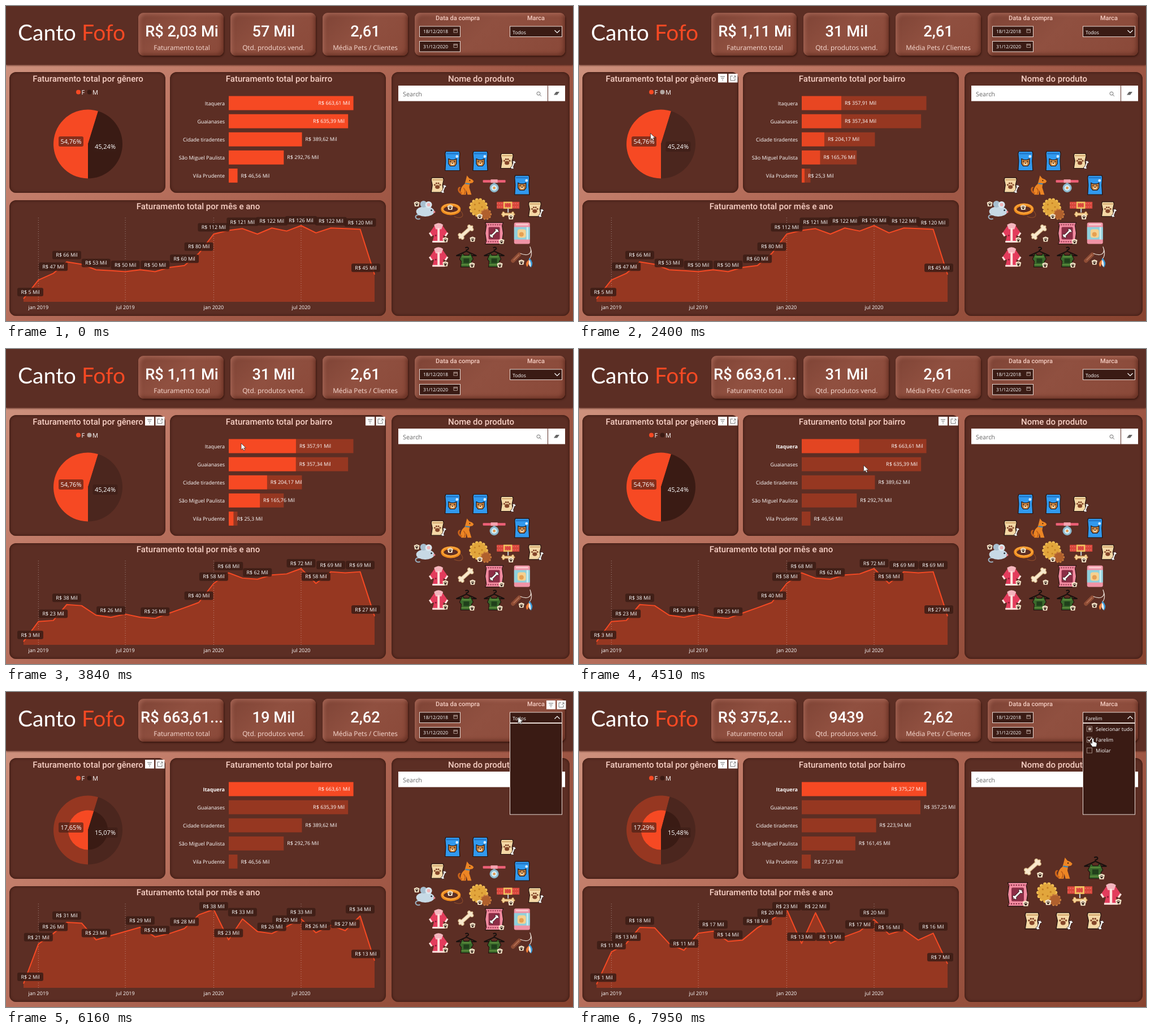
An HTML page for the animation above (8 s loop, 1003x558 px).

```html
<!DOCTYPE html>
<html lang="pt-BR">
<head>
<meta charset="utf-8">
<title>Painel de vendas</title>
<style>
html, body { margin: 0; width: 100%; height: 100%; overflow: hidden; }
body {
  position: relative;
  background: linear-gradient(140deg, #cf9480 5%, #bf7865 30%, #a15947 62%, #87432f);
}
div, svg { position: absolute; box-sizing: border-box; }
svg { left: 0; top: 0; }
#head { left: 0; top: 0; width: 100%; height: 104px; background: #5c2e24; box-shadow: 0 1px 3px #4a2017; }
.panel { background: #5c2e24; border-radius: 12px; box-shadow: inset 0 0 4px 1px #3f1c14; }
.card {
  border-radius: 9px;
  background: linear-gradient(135deg, #7f4436, #905040 45%, #8a4939);
  box-shadow: inset 5px 5px 6px -2px #b8766590, inset -5px -5px 6px -2px #5b281db0, 1px 2px 3px #3b1810;
}
text { font-family: "Open Sans", "Noto Sans", sans-serif; font-size: 9px; fill: #fff; text-rendering: geometricPrecision; }
.din { font-family: Roboto, sans-serif; font-weight: 500; }
.title { font-size: 15px; fill: #f7cfc4; }
.sub { font-size: 11px; fill: #f7cfc4; }
.big { font-size: 27.3px; }
.cap { font-size: 11.8px; fill: #f9dcd3; }
.brand { font-family: Lato, sans-serif; font-size: 39px; }
.pct { font-size: 11px; }
.date { font-size: 8.3px; }
.pick { font-size: 8.6px; }
.find { font-size: 10.8px; fill: #666; }
.bold { font-weight: 700; }
</style>
</head>
<body>
<div id="head"></div>
<svg id="stage" width="1003" height="558" viewBox="0 0 1003 558"></svg>
<script>
const LOOP = 8000;
const HOT = '#f64923', DIM = '#963721', DARK = '#3a1b14', DARK_DIM = '#4b261e';
const stage = document.getElementById('stage');

// ---- helpers ----
const lerp = (a, b, p) => a + (b - a) * p;
const clamp = (v, a, b) => Math.min(b, Math.max(a, v));
const ease = p => p < .5 ? 2 * p * p : 1 - 2 * (1 - p) ** 2;
const nums = s => s.split(' ').map(Number);

const text = (x, y, s, cls = '', anchor = 'start', fill = '') =>
  `<text x="${x}" y="${y}" class="${cls}" text-anchor="${anchor}"${fill && ` style="fill:${fill}"`}>${s}</text>`;
const mid = (x, y, s, cls) => text(x, y, s, cls, 'middle');
const rect = (x, y, w, h, fill, more = '') =>
  `<rect x="${x}" y="${y}" width="${w}" height="${h}" fill="${fill}" ${more}/>`;
const path = (d, fill, more = '') => `<path d="${d}" fill="${fill}" ${more}/>`;
const line = (d, color, w = 1, more = '') => path(d, 'none', `stroke="${color}" stroke-width="${w}" ${more}`);
const dot = (x, y, r, fill, more = '') => `<circle cx="${x}" cy="${y}" r="${r}" fill="${fill}" ${more}/>`;
const oval = (x, y, rx, ry, fill, more = '') =>
  `<ellipse cx="${x}" cy="${y}" rx="${rx}" ry="${ry}" fill="${fill}" ${more}/>`;
const group = (x, y, inner, more = '') => `<g transform="translate(${x} ${y}) ${more}">${inner}</g>`;

// ---- clicks: each visual answers after its own delay ----
const CLICKS = [2070, 4200, 7260];
const WAIT = { bars: 167, cards: 250, charts: 380 };
const phase = (t, wait = 0) => CLICKS.filter(c => t >= c + wait).length;
const progress = (t, wait) => {
  const n = phase(t, wait);
  return n ? ease(clamp((t - CLICKS[n - 1] - wait) / 300, 0, 1)) : 1;
};

// ---- product icons, drawn around 0,0 ----
const INK = 'stroke="#24130f" stroke-width="1.2" stroke-linejoin="round"';
const bone = (x, y, k, turn, fill, edge = '') => group(x, y,
  path('M-7-2.5C-8-7-13-6-12-2C-15-1-15 1-12 2C-13 6-8 7-7 2.5H7C8 7 13 6 12 2C15 1 15-1 12-2C13-6 8-7 7-2.5Z', fill, edge),
  `rotate(${turn}) scale(${k})`);
const paw = (x, y, k, fill) => group(x, y,
  oval(0, 2, 3.4, 2.8, fill) + [-4, -1.5, 1.5, 4].map(u => dot(u, u * u / 6 - 3.8, 1.3, fill)).join(''), `scale(${k})`);
const badge = (x, y) => path(`M${x - 5} ${y - 3}l5-2l5 2l-1.5 7h-7z`, '#f8e8cc') + paw(x, y, .55, '#2b1711');
const ring = (n, r, draw) => Array.from({ length: n }, (_, i) =>
  draw(r * Math.cos(i * 2 * Math.PI / n), r * Math.sin(i * 2 * Math.PI / n))).join('');

const ICONS = {
  feed: () => path('M-12-17H12L13-13L12 0L13 17H-13L-12 0L-13-13Z', '#3199ee', INK)
    + rect(-11, -14, 22, 2, '#1f72c4') + dot(8, -8, 2.4, '#cfe9ff')
    + path('M-7-4L-3-2H3L7-4V5L4 9H-4L-7 5Z', '#c88443', INK)
    + oval(0, 5, 3, 2.6, '#f3d4a5') + dot(-3.5, 1, 1, '#24130f') + dot(3.5, 1, 1, '#24130f') + dot(0, 4, 1.1, '#24130f'),
  treat: () => path('M-12-13H8L9-9L7 0L9 13H-13L-11 0L-13-9Z', '#f4d8a6', INK)
    + rect(-11, -10, 19, 1.5, '#c89a5d') + paw(-2, 1, 1.2, '#84462a') + bone(9, 7, .55, -70, '#fff', INK),
  dog: () => path('M1-17L5-12L10-10L13-7L11-4L6-3L5 4L9 17H2L0 9L-1 17H-9C-12 10-9 2-3-2L-1-9Z', '#ec8524')
    + line('M-8 15C-17 11-13 3-11 5', '#cc641a', 3) + line('M-2-3L6-2', '#3b83b7', 2)
    + dot(6, -8, 1, '#24130f') + line('M-4 16C-1 12-2 8-5 5', '#bb5b18', 1.5),
  leash: () => rect(-20, -9, 40, 4.5, '#ee6077', 'rx="1"') + rect(-6, -10, 12, 6, '#f7a2ae')
    + rect(-2, -4, 4, 6, '#8cabb9') + dot(0, 5, 8, '#8bb9cd') + dot(0, 5, 5, '#d6edf3') + dot(0, 5, 2.3, '#e4964b'),
  mouse: () => line('M-7 10C-20 8-18 20-8 17', '#9ab3c4', 2) + oval(1, 4, 16, 9, '#c7d9e5')
    + dot(-2, -9, 6, '#a8bfd0') + dot(7, -8, 6, '#dbe9f1') + dot(7, -8, 3, '#efb2b5')
    + dot(12, 2, 1.4, '#26313a') + dot(17, 5, 1.8, '#ec8b93') + badge(-14, -9),
  collar: () => line('M13 2C24 12 16 18 3 13', '#8a4a2b', 1.2)
    + oval(-3, 0, 15, 8, 'none', 'stroke="#ef8b1c" stroke-width="5"')
    + oval(-3, -1, 15, 8, 'none', 'stroke="#ffc164" stroke-width="1"') + badge(-4, -3),
  cookies: () => ring(14, 14, (x, y) => dot(x - 3, y - 3, 2.8, '#f1bd52')) + dot(-3, -3, 14, '#e2a63c')
    + ring(10, 8, (x, y) => dot(x + 10, y + 9, 2.2, '#c97b3c')) + dot(10, 9, 8, '#b0602d')
    + ring(5, 7, (x, y) => dot(x - 4, y - 4, 1.5, '#c47f24')) + badge(-1, 13),
  buckle: () => rect(-20, -13, 40, 12, '#d9473d') + line('M-20-10H20M-20-4H20', '#f28473', 1, 'stroke-dasharray="2 2"')
    + rect(-7, -12, 13, 10, 'none', 'stroke="#f2c35f" stroke-width="2.5"') + line('M0-1V6', '#c7d2d8', 2)
    + bone(0, 9, .85, 0, '#f4d296', 'stroke="#b97a3a"') + badge(5, 14),
  coat: () => path('M-6-15L6-15L15-2L13 5L8 4L11 16H-11L-8 4L-13 5L-15-2Z', '#e33c5c')
    + path('M-8-15Q0-21 8-15L5-7H-5Z', '#f5b5bd') + path('M-2-9H2V16H-2Z', '#ffe3de')
    + line('M-16-1L-12 5M16-1L12 5M-11 15H11', '#ffe3de', 3) + dot(-5, 4, 1.5, '#8f1d38') + badge(12, 12),
  bone: () => bone(-1, -2, 1.15, -42, '#f8e9cd', 'stroke="#d9b98a"') + badge(11, 11),
  snack: () => path('M-16-19H16L14-14L16 0L14 14L16 19H-16L-14 14L-16 0L-14-14Z', '#f28ba0', INK)
    + line('M-15-15H15M-15 15H15', '#8a2d45', 2, 'stroke-dasharray="2 2"') + rect(-10, -11, 20, 22, '#8a2d45', 'rx="2"')
    + bone(0, 0, .7, -45, '#fff', INK) + badge(13, 15),
  can: () => rect(-14, -19, 28, 38, '#ef93a5', 'rx="3"') + rect(-14, -11, 28, 22, '#8fd0dc')
    + rect(-8, -7, 15, 15, '#f5d190', 'rx="4"') + dot(-1, 2, 4, '#e6a052') + rect(-11, -17, 22, 3, '#fac9cf') + rect(8, -11, 3, 22, '#c9edf1'),
  vest: () => line('M0-10V-13C6-14 4-20-2-17M0-11L-18-3H18Z', '#17100e', 2)
    + path('M-7-8L-4-4H4L7-8L12 3L9 7L10 17H-10L-9 7L-12 3Z', '#3a6a2c', INK)
    + path('M-5 2H5V10H-5Z', '#203f1b') + line('M-9 13H9M-8-1H8', '#6c9b43', 1.2) + badge(10, 14),
  wand: () => line('M-16 6L-5-5', '#8f4d35', 7, 'stroke-linecap="round"') + line('M-15 5L-5-5', '#bc765a', 1.5)
    + line('M-3-7C8-2 20-5 14-19M14-19Q20-5 13 3', '#e6d8ce', 1.2) + path('M13 1Q22 9 16 18Q8 11 13 1Z', '#3c9bd9')
    + path('M12 4Q13 12 9 17Q4 11 12 4Z', '#f07e38') + path('M13 4Q17 11 15 17Q10 12 13 4Z', '#f6eee5') + badge(-1, 9)
};

const shelf = (rows, cx, top, dx, dy, k) => rows.map((row, r) => row.split(' ').map((name, i, all) =>
  group(cx + (i - (all.length - 1) / 2) * dx, top + r * dy, ICONS[name](), `scale(${k})`)).join('')).join('');
const SHELF_ALL = shelf(['feed feed treat', 'treat dog leash feed', 'mouse collar cookies buckle treat',
  'coat bone snack can', 'coat vest vest wand'], 839, 274.5, 49.2, 42.7, 1);
const SHELF_BRAND = shelf(['bone dog vest', 'snack cookies buckle coat', 'treat treat treat'], 858.5, 312, 55, 46.6, 1.1);

// ---- data, one entry per phase ----
const CARDS = [
  ['Faturamento total', ['R$ 2,03 Mi', 'R$ 1,11 Mi', 'R$ 663,61...', 'R$ 375,2...']],
  ['Qtd. produtos vend.', ['57 Mil', '31 Mil', '19 Mil', '9439']],
  ['Média Pets / Clientes', ['2,61', '2,61', '2,62', '2,62']]
];
const PLACES = ['Itaquera', 'Guaianases', 'Cidade tiradentes', 'São Miguel Paulista', 'Vila Prudente'];
const SALES = nums('663.61 635.39 389.62 292.76 46.56');
const SALES_F = nums('357.91 357.34 204.17 165.76 25.3');
const SALES_BRAND = nums('375.27 357.25 223.94 161.45 27.37');

// month:value is tagged, month~value only bends the curve, gaps are straight
const MONTHS = 25;
const CURVES = [
  '0:5 1~36 2:47 3:66 4~62 5:53 7:50 8~53 9:50 10~57 11:60 12:80 13:112 14~118 15:121 16~112 17:122 18~117 19:126 20~114 21:122 23:120 24:45',
  '0:3 1~22 2:23 3:38 4~37 5~28 6:26 7~29 8~26 9:25 12:40 13:58 14:68 15~63 16:62 17~66 18~67 19:72 20:58 21:69 22~68 23:69 24:27',
  '0:2 1:21 2:26 3:31.4 4~31 5:23 8:29 9:24.4 10~26 11:28.4 12~35 13:37.6 14:23 15:33 16~27 17:26 18:29.4 19:33 20:26.4 21~30 22:27.4 23:34.4 24:13',
  '0:1 1:10.5 2:13 3:17.7 4~17.6 5~13 6:11 7~16 8:16.6 9:13.6 10~14 11:17.6 12:20 13:23 14:13 15:22 16:13 17~15 18:16.6 19:20 20:15.7 21~17 22~14 23:16 24:7'
].map((series, n) => {
  const keys = series.split(' ').map(s => [...s.split(/[:~]/).map(Number), s.includes(':')]);
  const top = Math.max(...keys.map(k => k[1])), height = n < 2 ? 135 : 139;
  const ys = Array.from({ length: MONTHS }, (_, i) => {
    const b = keys.find(k => k[0] >= i), a = keys.findLast(k => k[0] <= i);
    const v = a === b ? a[1] : lerp(a[1], b[1], (i - a[0]) / (b[0] - a[0]));
    return 524 - height * v / top;
  });
  return { ys, tags: keys.filter(k => k[2]).map(([i, v]) => [i, Math.round(v)]) };
});
const START = Date.UTC(2018, 11, 1);
const monthX = i => 31 + (Date.UTC(2018, 11 + i, 1) - START) / 864e5 * .8495;

const POINTER = [
  [890, 0, 60], [1650, 114, 222], [1930, 126, 225], [3080, 127, 226], [3500, 300, 233], [3840, 416, 167],
  [4170, 416, 167], [4510, 503, 206], [4930, 748, 190], [5700, 905, 45], [6250, 906, 44], [7060, 909, 82]
];
const pointerAt = t => {
  if (t < POINTER[0][0]) return null;
  const k = POINTER.findIndex(s => s[0] > t);
  if (k < 0) return POINTER.at(-1).slice(1);
  const [a, b] = [POINTER[k - 1], POINTER[k]], p = (t - a[0]) / (b[0] - a[0]);
  return [lerp(a[1], b[1], p), lerp(a[2], b[2], p)];
};

// ---- fixed parts ----
const box = (cls, x, y, w, h) => {
  const el = document.createElement('div');
  el.className = cls;
  el.style.cssText = `left:${x}px;top:${y}px;width:${w}px;height:${h}px`;
  document.body.insertBefore(el, stage);
};
const GENDER = [6, 117, 276, 214], PLACE = [290, 117, 382, 214], PRODUCT = [682, 117, 315, 432], BRAND = [892, 12, 100, 76];
[GENDER, PLACE, [6, 344, 666, 205], PRODUCT].forEach(b => box('panel', ...b));
CARDS.forEach((_, i) => box('card', 234 + i * 163, 12, 151, 76));
box('card', 723, 12, 266, 76);
const cardX = i => 311 + i * 162.3;

const EDGE = 'stroke="#eadbd5" stroke-width="1"';
const dateBox = (y, s) => rect(731.5, y, 72, 18.5, DARK, EDGE) + text(738, y + 12.3, s, 'date')
  + rect(792, y + 5, 6.5, 6, 'none', 'stroke="#c9b3ab" stroke-width=".8"') + line(`M792 ${y + 6.7}h6.5`, '#c9b3ab');

const FIXED = text(21, 61, 'Canto', 'brand') + text(134, 61, 'Fofo', 'brand', 'start', HOT)
  + CARDS.map(([s], i) => mid(cardX(i), 77.5, s, 'cap')).join('')
  + mid(799, 24.5, 'Data da compra', 'din sub') + mid(937.5, 24.5, 'Marca', 'din sub')
  + dateBox(36, '18/12/2018') + dateBox(62.5, '31/12/2020')
  + mid(145, 134, 'Faturamento total por gênero', 'din title') + mid(483, 134, 'Faturamento total por bairro', 'din title')
  + mid(340, 360, 'Faturamento total por mês e ano', 'din title') + mid(840.5, 134, 'Nome do produto', 'din title')
  + rect(694, 141, 264, 27.5, '#fff') + rect(959, 141, 30, 27.5, '#fff') + text(702, 159.5, 'Search', 'find')
  + dot(942, 155, 3, 'none', 'stroke="#777"') + line('M944 157L947 160', '#777')
  + path('M969 157.5L973 152H979L975 157.5Z', '#666');

// ---- moving parts ----
const drawCards = t => CARDS.map(([, shown], i) =>
  mid(cardX(i), 54, shown[phase(t, WAIT.cards + i * 70)], 'din big')).join('');

const slice = (r, from, to, fill) => {
  const pt = a => `${145 + r * Math.sin(a)} ${244.5 - r * Math.cos(a)}`;
  return path(`M145 244.5L${pt(from)}A${r} ${r} 0 ${to - from > Math.PI ? 1 : 0} 1 ${pt(to)}Z`, fill);
};
const PIE_TAGS = ['54,76% 45,24%', '54,76% 45,24%', '17,65% 15,07%', '17,29% 15,48%'];
const drawPie = t => {
  const n = phase(t, WAIT.charts), p = progress(t, WAIT.charts);
  const cut = Math.PI * (1 - 2 * lerp(.4524, .459, n === 3 ? p : 0));
  const picked = phase(t) === 1, inner = n > 1;
  const halves = (r, f, m) => slice(r, Math.PI, 2 * Math.PI + cut, f) + slice(r, cut, Math.PI, m);
  const tag = (x, y, s) => rect(x - 22, y - 9, 44, 18, '#3b1d16', 'rx="3" opacity=".6"') + mid(x, y + 4, s, 'pct');
  const [f, m] = PIE_TAGS[n].split(' ');
  return dot(128, 152.5, 4, HOT) + text(133.5, 156.5, 'F', 'pct')
    + dot(147.5, 152.5, 4, picked ? '#b3a6a1' : DARK) + text(153, 156.5, 'M', 'pct')
    + halves(61, inner ? DIM : HOT, inner || picked ? DARK_DIM : DARK)
    + (inner ? halves(35 * (n === 2 ? p : 1), HOT, DARK) : '')
    + tag(115, 240, f) + tag(175.5, 249, m);
};

const drawBars = t => {
  const n = phase(t, WAIT.bars), p = progress(t, WAIT.bars);
  const vals = SALES.map((v, i) => lerp(v, SALES_BRAND[i], n === 3 ? p : 0));
  const scale = 220.5 / vals[0];
  const shown = [SALES, SALES_F, SALES, SALES_BRAND][n];
  return PLACES.map((name, i) => {
    const y = 159.6 + i * 32.1, w = vals[i] * scale, only = i ? 0 : w;
    const hi = [w, SALES_F[i] * scale * p, only * p, only][n];
    const inside = n !== 1 && w > 210, end = 394 + (n === 1 ? hi : w);
    return text(387, y + 16, name, n > 1 && !i ? 'bold' : '', 'end')
      + rect(394, y, w, 24.8, DIM) + rect(394, y, hi, 24.8, HOT, `opacity="${n === 3 ? 1 : .65 + .35 * p}"`)
      + text(inside ? end - 6 : end + 6, y + 15.5, `R$ ${String(shown[i]).replace('.', ',')} Mil`, '', inside ? 'end' : 'start');
  }).join('');
};

const AXIS = [1, 7, 13, 19].map(i =>
  line(`M${monthX(i)} 375V524`, '#ffffff70', 1, 'stroke-dasharray="1 3"')
  + mid(monthX(i), 537, `${i % 12 === 1 ? 'jan' : 'jul'} ${2019 + Math.floor(i / 12)}`)).join('');
const drawCurve = t => {
  const n = phase(t, WAIT.charts), p = progress(t, WAIT.charts);
  const now = CURVES[n], old = CURVES[Math.max(0, n - 1)];
  const ys = now.ys.map((y, i) => lerp(old.ys[i], y, p));
  const d = 'M' + ys.map((y, i) => `${monthX(i)} ${y}`).join('L');
  const tags = now.tags.map(([i, v]) => {
    const w = 41 + 5 * String(v).length;
    const x = clamp(monthX(i), 20 + w / 2, 662 - w / 2), y = Math.max(379.5, ys[i] - 12);
    return rect(x - w / 2, y - 7.5, w, 15, '#3b1d16', 'rx="3" opacity=".85"') + mid(x, y + 3.2, `R$ ${v} Mil`);
  }).join('');
  return path(d + 'V524H31Z', DIM) + AXIS + line(d, HOT, 2, 'stroke-linejoin="round"') + tags;
};

// hover buttons of a panel; the gender panel keeps its own once selected
const drawTools = t => {
  const at = pointerAt(t);
  if (!at) return '';
  const over = ([x, y, w, h]) => at[0] >= x && at[0] <= x + w && at[1] >= y && at[1] <= y + h;
  const lit = [GENDER, PLACE, PRODUCT, BRAND].filter(b =>
    over(b) && !(b === BRAND && t > 6500) || b === GENDER && t > CLICKS[0]);
  return lit.map(([px, py, w]) => {
    const x = px + w - 36, y = py + 3;
    return rect(x, y, 16, 15.5, '#fff') + line(`M${x + 4} ${y + 5}h8m-6.5 3h5m-3.5 3h2`, '#666')
      + rect(x + 18.5, y, 16, 15.5, '#fff') + line(`M${x + 26} ${y + 4}h-4v8h8v-4m-2-4h3v3m0-3l-4 4`, '#777');
  }).join('');
};

const drawPicker = t => {
  const open = t >= 5980, loaded = t >= 6400, checked = t >= CLICKS[2] + 40;
  const marks = checked ? [rect(901, 63, 5, 5, '#b9a49c'), line('M900 84.5L902.5 87L907 81.5', '#fff', 1.2)] : [];
  const items = ['Selecionar tudo', 'Farelim', 'Miolar'].map((s, i) => {
    const y = 65.5 + i * 19;
    return rect(898.5, y - 4.5, 9, 9, 'none', 'stroke="#9c857d"') + (marks[i] || '') + text(914, y + 3.3, s);
  }).join('');
  return rect(891.5, 36, 92, 18.5, DARK, EDGE) + text(896, 49.5, checked ? 'Farelim' : 'Todos', 'pick')
    + line(open ? 'M970.5 47.5L975 43L979.5 47.5' : 'M970.5 43L975 47.5L979.5 43', '#fff', 1.2)
    + (open ? rect(891.5, 55.5, 92, 161.5, DARK, EDGE) : '') + (loaded ? items : '');
};

const ARROW = path('M0 0V11.5L2.7 9L4.7 13L6.6 12L4.8 8.2H8.4Z', '#fff', 'stroke="#222" stroke-width=".7"');
const HAND = path('M-1.5 1Q0-1 1.5 1V6L6 7.5Q7.5 8 7 11L6 15H-1L-4.5 9.5Q-4 7.5-1.5 9Z', '#fff', 'stroke="#222" stroke-width=".8"');
const drawPointer = t => {
  const at = pointerAt(t);
  return at ? group(...at, t >= 6600 ? HAND : ARROW) : '';
};

// ---- layers ----
const layers = [
  () => FIXED, drawCards, drawPie, drawBars, drawCurve,
  t => phase(t, WAIT.charts) < 3 ? SHELF_ALL : SHELF_BRAND,
  drawTools, drawPicker, drawPointer
].map(draw => {
  const el = stage.appendChild(document.createElementNS('http://www.w3.org/2000/svg', 'g'));
  return { draw, el, last: null };
});

function render(t) {
  for (const layer of layers) {
    const html = layer.draw(t);
    if (html !== layer.last) layer.el.innerHTML = layer.last = html;
  }
}
const begin = performance.now();
function tick() {
  render((performance.now() - begin) % LOOP);
  requestAnimationFrame(tick);
}
tick();
</script>
</body>
</html>
```
